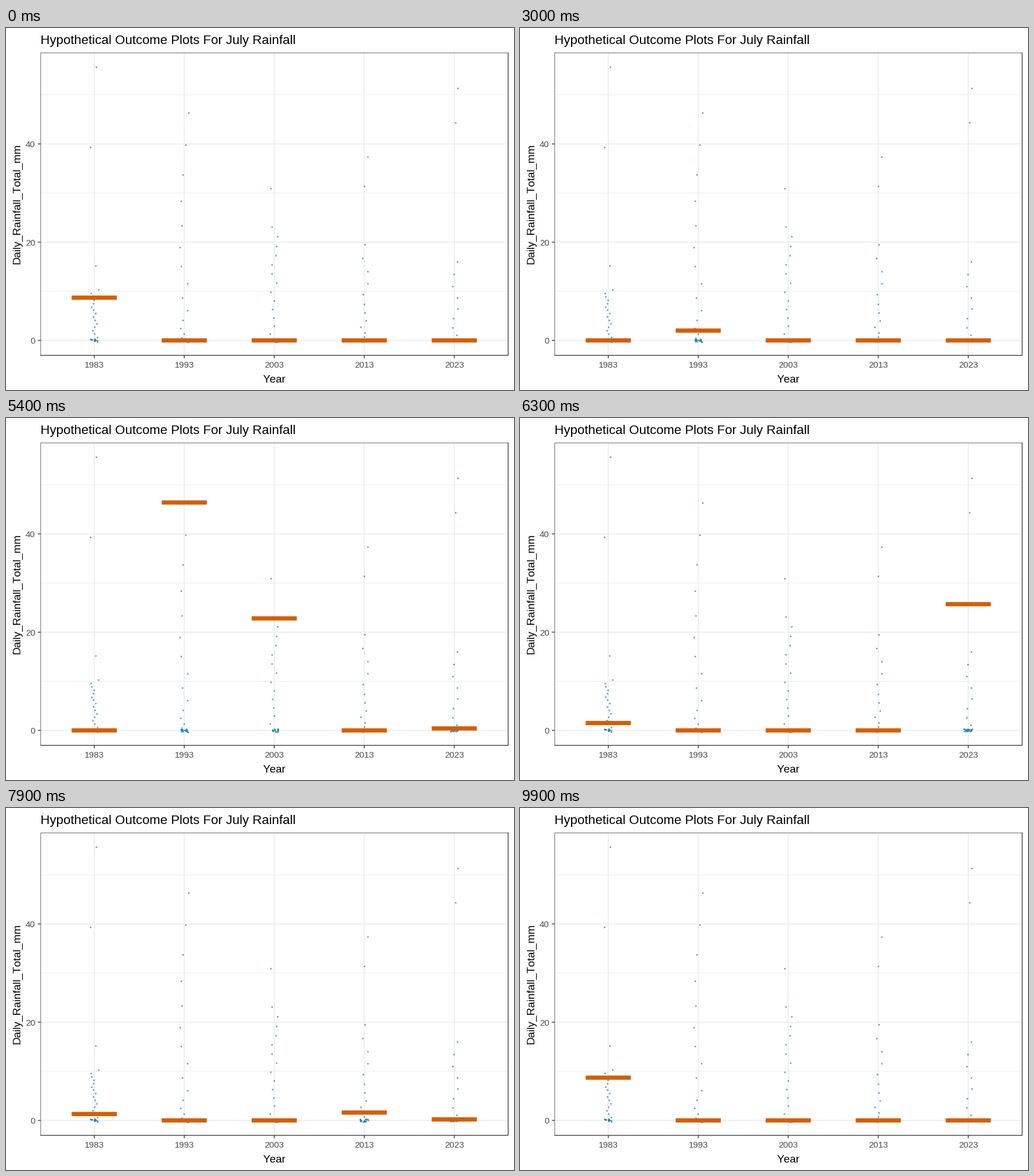
A matplotlib script that plays this animation: 885 by 632 pixels, repeating every 10 s.

```python
import matplotlib.pyplot as plt
import numpy as np
from matplotlib.animation import FuncAnimation
from matplotlib.patches import Rectangle

W, H, DPI = 885, 632, 100
PX = 72 / DPI  # points per pixel
LEFT, TOP, RIGHT, BOTTOM = 60.5, 43.5, 874.8, 571.5
YEARS = range(1983, 2024, 10)
BAR_W, BAR_H = 78.6, 7.4
FRAMES = 100

plt.rcParams.update({"font.family": "Liberation Sans", "path.snap": False,
                     "text.kerning_factor": 6})
fig = plt.figure(figsize=(W / DPI, H / DPI), dpi=DPI, facecolor="white")
ax = fig.add_axes([0, 0, 1, 1])
ax.set_xlim(0, W)
ax.set_ylim(H, 0)
ax.axis("off")


def x_of(i):
    return 153.7 + 156.8 * i


def y_of(mm):
    return 545.4 - 8.575 * mm


def line(xs, ys, color, width, z=1):
    ax.plot(xs, ys, color=color, lw=width * PX, zorder=z,
            solid_capstyle="projecting" if z == 5 else "butt")


def label(x, y, text, size, color="black", **kw):
    ax.text(x, y, text, fontsize=size * PX, color=color, va="baseline", **kw)


def add_month(i, extremes, peak, wet, power):
    """A July: a few extreme days, wet days falling off from peak, dry rest."""
    rng = np.random.default_rng(YEARS[i])
    decay = peak * (1 - np.arange(wet) / wet) ** power
    rain = np.r_[extremes, decay, np.zeros(31 - wet - len(extremes))]
    rain += np.where(rain == 0, rng.uniform(-0.3, 0.3, 31), 0)
    xs = x_of(i) + rng.uniform(-7.5, 7.5, 31)
    ax.scatter(xs, y_of(rain), s=(3 * PX) ** 2, color="#0072B2",
               alpha=0.6, linewidths=0, zorder=3)


# Panel, grid and axes
for mm in (10, 30, 50):
    line([LEFT, RIGHT], [y_of(mm)] * 2, "#EBEBEB", 0.9)
for mm in (0, 20, 40):
    y = y_of(mm)
    line([LEFT, RIGHT], [y, y], "#EBEBEB", 1.6)
    line([LEFT - 5, LEFT], [y, y], "#333333", 1.4)
    label(50.8, y + 5.6, str(mm), 15.2, "#4D4D4D", ha="right")
for i, year in enumerate(YEARS):
    x = x_of(i)
    line([x, x], [TOP, BOTTOM], "#EBEBEB", 1.6)
    line([x, x], [BOTTOM, BOTTOM + 5], "#333333", 1.4)
    label(x, 593.3, str(year), 15.2, "#4D4D4D", ha="center")
line([LEFT, LEFT, RIGHT], [BOTTOM, TOP, TOP], "#6B6B6B", 1, 5)
line([LEFT, RIGHT, RIGHT], [BOTTOM, BOTTOM, TOP], "#333333", 1.3, 5)

label(59.5, 28.3, "Hypothetical Outcome Plots For July Rainfall", 22.4)
label(467.3, 619, "Year", 18.9, ha="center")
label(24.6, 307, "Daily_Rainfall_Total_mm", 19, ha="center",
      rotation=90, rotation_mode="anchor")

add_month(0, [55.7, 39.4, 15.2], 10.3, 15, 1)
add_month(1, [], 46.3, 15, 2.2)
add_month(2, [31], 23.1, 13, 1.1)
add_month(3, [37.4, 31.4], 19.5, 12, 1.8)
add_month(4, [51.4, 44.4], 16, 8, 1.3)

# Key poses: one sampled day per year in each draw, dry where left out
DRAWS = [
    {0: 8.7}, {3: 2.6}, {}, {0: 1.9, 4: 51.4}, {0: 15, 2: 20}, {0: 15, 2: 5},
    {1: 2}, {0: 6, 2: 9.5, 4: 5}, {2: 16.2}, {0: 4, 3: 9}, {},
    {1: 46.4, 2: 22.8, 4: 0.4}, {}, {0: 3, 4: 51.4}, {0: 8.7, 3: 37.4, 4: 0.2},
    {1: 25.6}, {0: 1.3, 3: 1.6, 4: 0.2}, {1: 38.7}, {0: 4, 1: 20.1}, {3: 2.3},
]

bars = [ax.add_patch(Rectangle((x_of(i) - BAR_W / 2, 0), BAR_W, BAR_H,
                               fc="#D55E00", lw=0, zorder=4))
        for i in range(len(YEARS))]


def update(frame):
    # Four held steps and one halfway step per draw; one hold is a step shorter
    step = frame + (frame >= 50)
    k, phase = divmod(step, 5)
    now, nxt = DRAWS[k % len(DRAWS)], DRAWS[(k + 1) % len(DRAWS)]
    t = 0.5 if phase == 4 else 0
    for i, bar in enumerate(bars):
        mm = (1 - t) * now.get(i, 0) + t * nxt.get(i, 0)
        bar.set_y(y_of(mm) - BAR_H / 2)
    return bars


anim = FuncAnimation(fig, update, frames=FRAMES, interval=100,
                     repeat=True, repeat_delay=0)
plt.show()
```
